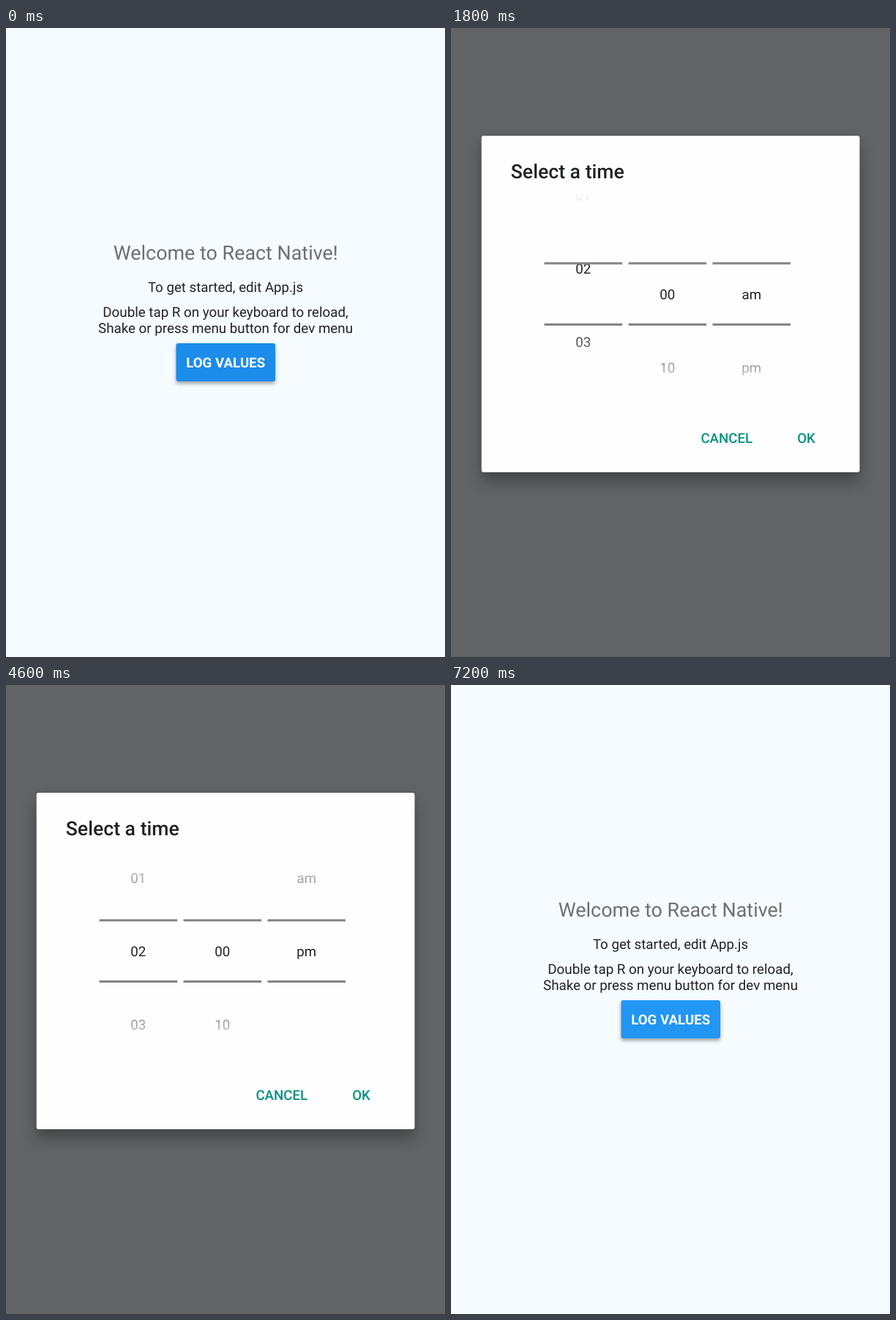
Animation, 600 px wide and 858 px high, one loop 7300 ms. Source, as an HTML page:

```html
<!DOCTYPE html>
<html lang="en">
<head>
<meta charset="utf-8">
<title>Time picker</title>
<style>
  html, body { margin: 0; width: 100%; height: 100%; overflow: hidden; background: #f6fbff; }
  svg { display: block; width: 600px; height: 858px; }
  text { font: 18.7px Roboto, sans-serif; fill: #212225; text-rendering: geometricPrecision; }
  .mid { text-anchor: middle; }
  .heading { font-size: 26.9px; fill: #6d6f72; }
  .hint { font-size: 18.77px; }
  .title { font-size: 26.6px; font-weight: 500; }
  .label { font-weight: 700; fill: #fff; }
  .action { font-weight: 500; fill: #009182; }
  #button { filter: drop-shadow(0 3px 2.5px rgba(0, 0, 0, .36)); }
  .card {
    fill: #fefefe;
    filter: drop-shadow(0 0 6px rgba(0, 0, 0, .1)) drop-shadow(0 14px 9px rgba(0, 0, 0, .26));
  }
  .rules { stroke: #838384; stroke-width: 3; }
</style>
</head>
<body>
<svg viewBox="0 0 600 858">
  <defs>
    <linearGradient id="edges" gradientUnits="userSpaceOnUse" x1="0" x2="0" y1="224" y2="504">
      <stop offset="0" stop-color="#fff" stop-opacity="0"/>
      <stop offset=".36" stop-color="#fff"/>
      <stop offset=".64" stop-color="#fff"/>
      <stop offset="1" stop-color="#fff" stop-opacity="0"/>
    </linearGradient>
    <mask id="fade" maskUnits="userSpaceOnUse" x="120" y="224" width="350" height="280">
      <rect x="120" y="224" width="350" height="280" fill="url(#edges)"/>
    </mask>
  </defs>

  <rect width="600" height="858" fill="#f6fbff"/>
  <g class="mid">
    <text class="heading" x="300.3" y="316">Welcome to React Native!</text>
    <text x="300" y="360">To get started, edit App.js</text>
    <text class="hint" x="300" y="393.6">Double tap R on your keyboard to reload,</text>
    <text class="hint" x="300" y="415.8">Shake or press menu button for dev menu</text>
    <rect id="button" x="232.5" y="430" width="135.5" height="52" rx="3"/>
    <text class="label" x="300.2" y="463.2">LOG VALUES</text>
  </g>

  <rect id="dim" width="600" height="858"/>

  <g id="dialog">
    <rect class="card" x="41.7" y="147" width="516.8" height="459" rx="3"/>
    <text class="title" x="81.8" y="205.4">Select a time</text>
    <g id="wheels" class="mid" mask="url(#fade)"></g>
    <g id="rules" class="rules"></g>
    <text class="action mid" x="376.8" y="566.4">CANCEL</text>
    <text class="action mid" x="485.5" y="566.4">OK</text>
  </g>
</svg>
<script>
const LOOP = 7300, TICK = 100, ROW = 100;
const DIM = .605, WINDOW_GONE = 6300;
const byId = id => document.getElementById(id);
const dim = byId('dim'), dialog = byId('dialog'), button = byId('button');

const progress = (t, from, to) => Math.min(1, Math.max(0, (t - from) / (to - from)));
const easeOut = p => 1 - (1 - p) ** 3;
const smooth = p => p * p * (3 - 2 * p);

// A finger drags the wheel to a peak, then the wheel settles on its nearest row.
function spin(t, { start, release, end, peak, rest }) {
  const dragged = peak * smooth(progress(t, start, release));
  return dragged + (rest - peak) * easeOut(progress(t, release, end));
}

const count = (rows, step) =>
  Array.from({ length: rows }, (_, i) => String(i * step).padStart(2, '0'));

const wheels = [
  { items: count(24, 1), start: 1000, release: 1700, end: 2500, peak: 2.52, rest: 2 },
  { items: count(6, 10), start: 2700, release: 3100, end: 3600, peak: 1.2, rest: 0 },
  { items: ['am', 'pm'], start: 4300, release: 4500, end: 4600, peak: .8, rest: 1 }
];

function svg(tag, parent, attrs = {}) {
  const node = document.createElementNS('http://www.w3.org/2000/svg', tag);
  for (const key in attrs) node.setAttribute(key, attrs[key]);
  return parent.appendChild(node);
}

wheels.forEach((wheel, column) => {
  const x = 180.8 + column * 115;
  wheel.node = svg('g', byId('wheels'));
  wheel.items.forEach((item, i) => {
    svg('text', wheel.node, { x, y: 370 + i * ROW }).textContent = item;
  });
  for (const y of [321, 404.4]) {
    svg('path', byId('rules'), { d: `M${x - 53.3} ${y}h106.6` });
  }
});

function draw() {
  // The picture advances ten times a second.
  const t = Math.floor(performance.now() % LOOP / TICK) * TICK;
  const shown = progress(t, 100, 400);
  const shade = t < WINDOW_GONE ? 1 - progress(t, 5960, 6420) : 0;

  dim.setAttribute('opacity', DIM * shown * shade);
  dialog.setAttribute('opacity', shown * (1 - progress(t, 5940, 6230)));
  button.setAttribute('fill', t < 400 ? '#1c8cea' : '#2196f3');
  for (const wheel of wheels) {
    wheel.node.setAttribute('transform', `translate(0 ${-ROW * spin(t, wheel)})`);
  }
  requestAnimationFrame(draw);
}
draw();
</script>
</body>
</html>
```
